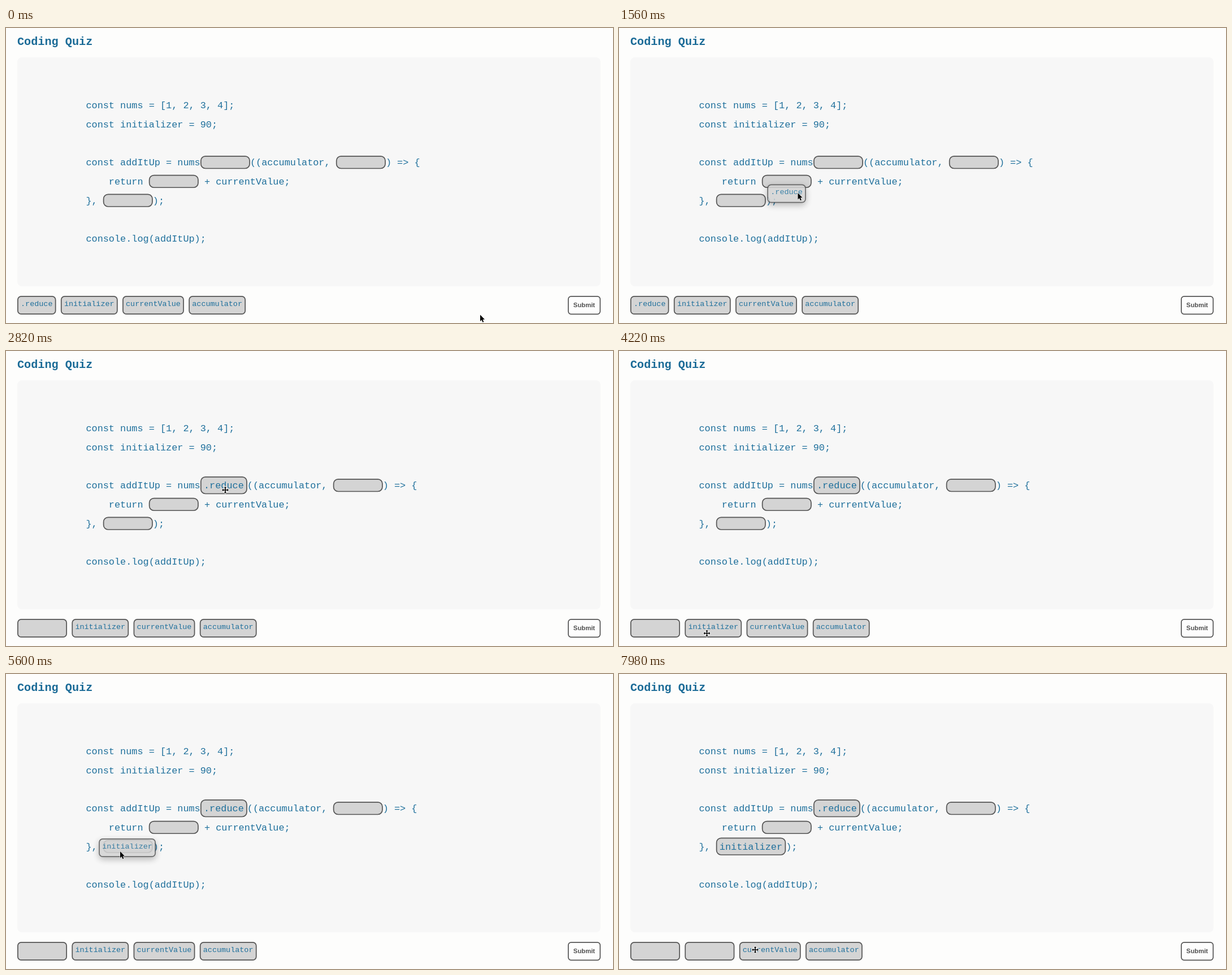
An HTML page for the animation above (8000 ms loop, 1074 by 522 pixels).

```html
<!DOCTYPE html>
<html lang="en">
<head>
<meta charset="utf-8">
<title>Coding Quiz</title>
<style>
  html, body { margin: 0; width: 100%; height: 100%; overflow: hidden; background: #fdfdfc; }
  svg { display: block; width: 1074px; height: 522px; cursor: default; }
  text { white-space: pre; fill: #1f709c; font-family: "Liberation Mono", "Courier New", monospace; }
  .title { font-size: 20.2px; font-weight: bold; fill: #1b6b97; }
  .code { font-size: 16.88px; }
  .label { font-size: 13.45px; }
  .box { fill: #d4d4d4; stroke: #555; stroke-width: 1.7; }
  .submit { font: bold 11.3px "Liberation Sans", Arial, sans-serif; fill: #505050; text-anchor: middle; }
  .lifted { filter: drop-shadow(0 4px 6px rgba(0, 0, 0, .3)); }
</style>
</head>
<body>
<svg viewBox="0 0 1074 522">
  <text class="title" x="20" y="30">Coding Quiz</text>
  <rect x="20" y="52" width="1032" height="405" rx="8" fill="#f7f7f7"/>
  <g id="code"></g>
  <g id="bank"></g>
  <rect x="994.9" y="474.9" width="56.4" height="31.4" rx="5" fill="#fdfdfd" stroke="#555" stroke-width="1.7"/>
  <text class="submit" x="1023" y="494">Submit</text>
  <g id="drag" class="lifted" opacity=".86"></g>
  <path id="arrow" d="M0 0V11.4L2.6 9L4.4 13.2L6.3 12.4L4.6 8.3H8Z" fill="#000" stroke="#fff" stroke-width="1" paint-order="stroke"/>
  <path id="move" d="M0-6L2.4-3.4H.8V-.8H3.4V-2.4L6 0L3.4 2.4V.8H.8V3.4H2.4L0 6L-2.4 3.4H-.8V.8H-3.4V2.4L-6 0L-3.4-2.4V-.8H-.8V-3.4H-2.4Z" fill="#000" stroke="#fff" stroke-width="1.6" paint-order="stroke"/>
</svg>
<script>
const LOOP = 8000;
const CODE_CHAR = 16.88 * 0.6, LABEL_CHAR = 13.45 * 0.6;
const SLOT = 88, GAP = 8.4, BANK_Y = 474, BANK_H = 33;
const words = ['.reduce', 'initializer', 'currentValue', 'accumulator'];

// Strings are code; numbers are slots holding the word of that index.
const lines = [
  ['const nums = [1, 2, 3, 4];'],
  ['const initializer = 90;'],
  [],
  ['const addItUp = nums', 0, '((accumulator, ', 2, ') => {'],
  ['    return ', 3, ' + currentValue;'],
  ['}, ', 1, ');'],
  [],
  ['console.log(addItUp);']
];

const drags = [
  { word: 0, from: 1000, to: 2300, dx: 54.2, dy: 15.5 },
  { word: 1, from: 4350, to: 6800, dx: 37.8, dy: 23 }
];

// Pointer stops: time, x, y
const stops = [
  [0, 839, 507.5], [150, 839, 507.5], [820, 75, 490], [1000, 75, 490],
  [1560, 316.5, 292], [1900, 388, 246], [2900, 388, 246],
  [3900, 155.5, 499.5], [4400, 155.5, 499.5],
  [4940, 211.3, 325], [5500, 202, 314], [6900, 202, 314],
  [7700, 241, 488], [LOOP, 241, 488]
];

const $ = id => document.getElementById(id);
const smooth = u => u * u * (3 - 2 * u);

function pointerAt(t) {
  const i = Math.max(1, stops.findIndex(s => s[0] > t));
  const [t0, x0, y0] = stops[i - 1], [t1, x1, y1] = stops[i];
  const u = smooth((t - t0) / (t1 - t0));
  return { x: x0 + (x1 - x0) * u, y: y0 + (y1 - y0) * u };
}

const text = (cls, x, y, s) => `<text class="${cls}" x="${x}" y="${y}">${s.replace('>', '&gt;')}</text>`;

const box = (x, y, w, h, r) =>
  `<rect class="box" x="${x + 0.85}" y="${y + 0.85}" width="${w - 1.7}" height="${h - 1.7}" rx="${r}"/>`;

const labelWidth = word => words[word].length * LABEL_CHAR + 12;

const chip = (word, x, y) =>
  box(x, y, labelWidth(word), BANK_H, 6) + text('label', x + 6, y + 18, words[word]);

function codeView(placed) {
  const hits = [];
  let out = '';
  lines.forEach((parts, row) => {
    const y = 142 + row * 33.75;
    let x = 141.4;
    for (const part of parts) {
      if (typeof part === 'string') {
        out += text('code', x, y, part);
        x += part.length * CODE_CHAR;
      } else if (placed.includes(part)) {
        const word = words[part], w = word.length * CODE_CHAR + 12;
        out += box(x, y - 21.3, w, 31.4, 8) + text('code', x + 6, y, word);
        hits.push([x, y - 21.3, w, 31.4]);
        x += w;
      } else {
        out += box(x, y - 17.3, SLOT, 23.4, 8);
        x += SLOT;
      }
    }
  });
  return { out, hits };
}

function bankView(placed) {
  const hits = [];
  let out = '', x = 20;
  words.forEach((_, i) => {
    const empty = placed.includes(i), w = empty ? SLOT : labelWidth(i);
    out += empty ? box(x, BANK_Y, w, BANK_H, 6) : chip(i, x, BANK_Y);
    if (!empty) hits.push([x, BANK_Y, w, BANK_H]);
    x += w + GAP;
  });
  return { out, hits };
}

let shownState = -1, hits = [];

function layout(count) {
  if (count === shownState) return;
  shownState = count;
  const placed = drags.slice(0, count).map(d => d.word);
  const code = codeView(placed), bank = bankView(placed);
  $('code').innerHTML = code.out;
  $('bank').innerHTML = bank.out;
  hits = [...code.hits, ...bank.hits];
}

function place(el, p, visible) {
  el.setAttribute('transform', `translate(${p.x} ${p.y})`);
  el.style.display = visible ? '' : 'none';
}

function render(t) {
  layout(drags.filter(d => t >= d.to).length);
  const p = pointerAt(t);
  const held = drags.find(d => t >= d.from && t < d.to);
  $('drag').innerHTML = held ? chip(held.word, p.x - held.dx, p.y - held.dy) : '';
  const hover = !held && hits.some(([x, y, w, h]) => p.x >= x && p.x <= x + w && p.y >= y && p.y <= y + h);
  place($('arrow'), p, !hover);
  place($('move'), p, hover);
}

const start = performance.now();
function tick() {
  render((performance.now() - start) % LOOP);
  requestAnimationFrame(tick);
}
render(0);
requestAnimationFrame(tick);
</script>
</body>
</html>
```
